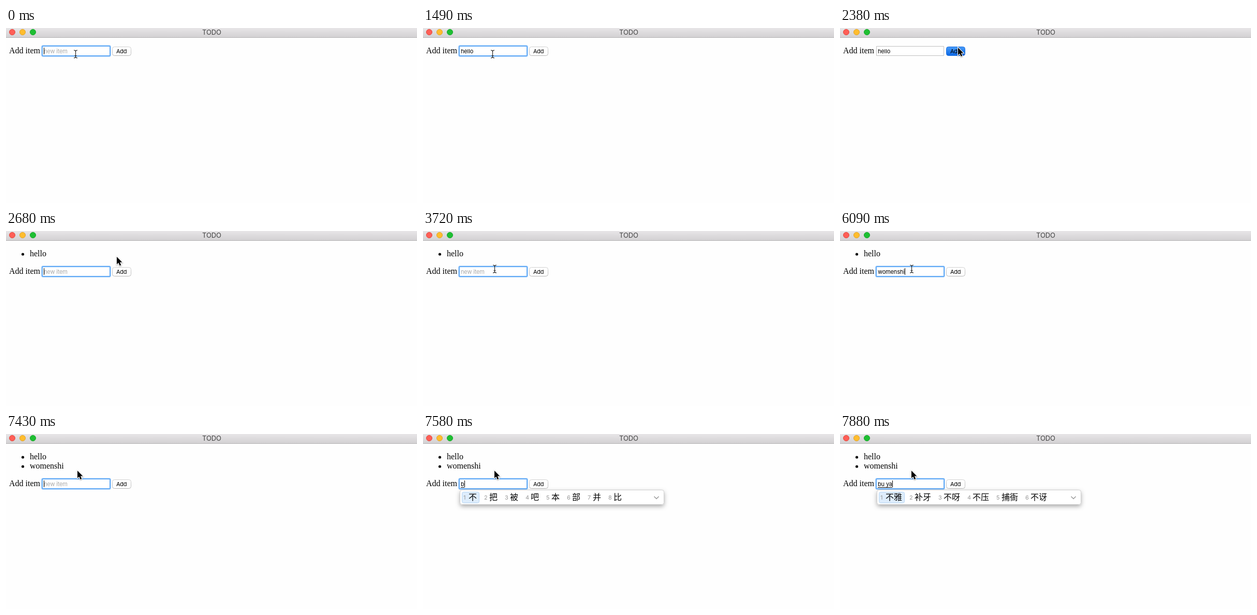
Write an HTML page with a canvas that moves like this. It is 794x339 px and loops after 8000 ms.

```html
<!DOCTYPE html>
<html lang="en">
<head>
<meta charset="utf-8">
<title>TODO</title>
<style>
html, body { margin: 0; width: 100%; height: 100%; overflow: hidden; background: #fefefe; }
canvas { display: block; }
</style>
</head>
<body>
<canvas id="stage" width="794" height="339"></canvas>
<script>
const ctx = document.getElementById('stage').getContext('2d');
const LOOP = 8000;
const UI = 'Inter, sans-serif', SERIF = '16px "Liberation Serif", serif';
const CJK = '16px "Noto Sans CJK SC", "Noto Sans CJK", sans-serif';
const FIELD_X = 73;

const start = { text: '', caret: true, focus: true, pressed: false, items: [], arrow: false, x: 134.5, y: 50.5, words: null };

// Each step changes part of the state from its time on.
const steps = [
  [150, { caret: false }],
  [300, { text: 'h', caret: true }],
  [450, { text: 'he' }],
  [600, { text: 'hel' }],
  [740, { text: 'hell' }],
  [890, { text: 'hello' }],
  [1490, { caret: false }],
  [1790, { x: 146.5, y: 49.5 }],
  [1940, { x: 184.5, y: 46.5, caret: true }],
  [2090, { arrow: true, x: 219, y: 39 }],
  [2230, { x: 228, y: 38 }],
  [2380, { pressed: true, focus: false }],
  [2530, { pressed: false, focus: true, text: '', items: ['hello'] }],
  [2680, { x: 214, y: 50 }],
  [2820, { arrow: false, x: 148.5, y: 68.5 }],
  [2970, { x: 141.5, y: 71.5, caret: false }],
  [3120, { x: 138.5, y: 73.5, caret: true }],
  [3720, { caret: false }],
  [4160, { caret: true }],
  [4610, { text: 'w' }],
  [4760, { text: 'wo' }],
  [5200, { caret: false }],
  [5350, { text: 'wom', caret: true }],
  [5490, { text: 'wome' }],
  [5640, { text: 'women' }],
  [5940, { text: 'womens' }],
  [6090, { text: 'womenshi' }],
  [6390, { text: '', items: ['hello', 'womenshi'], arrow: true, x: 138, y: 71 }],
  [6990, { caret: false }],
  [7430, { caret: true }],
  [7580, { text: 'b', words: ['不', '把', '被', '吧', '本', '部', '并', '比'] }],
  [7730, { text: 'bu', words: ['不', '部', '步', '补', '布', '捕', '卜', '簿'] }],
  [7880, { text: 'bu ya', words: ['不雅', '补牙', '不呀', '不压', '捕衙', '不讶'] }]
];

function stateAt(t) {
  const s = { ...start };
  for (const [time, change] of steps) if (time <= t) Object.assign(s, change);
  return s;
}

function label(str, x, y, font, color = '#000', spacing = 0) {
  ctx.font = font;
  ctx.letterSpacing = spacing + 'px';
  ctx.fillStyle = color;
  ctx.fillText(str, x, y);
}

function box(x, y, w, h, r, fill, stroke, width = 1) {
  ctx.beginPath();
  ctx.roundRect(x, y, w, h, r);
  if (fill) { ctx.fillStyle = fill; ctx.fill(); }
  if (stroke) { ctx.strokeStyle = stroke; ctx.lineWidth = width; ctx.stroke(); }
}

function disc(x, y, r, fill, stroke) {
  ctx.beginPath();
  ctx.arc(x, y, r, 0, 7);
  ctx.fillStyle = fill;
  ctx.fill();
  if (stroke) { ctx.strokeStyle = stroke; ctx.lineWidth = 1; ctx.stroke(); }
}

function fade(y0, y1, ...colors) {
  const g = ctx.createLinearGradient(0, y0, 0, y1);
  colors.forEach((c, i) => g.addColorStop(i / (colors.length - 1), c));
  return g;
}

function shadow(color, blur, dy) {
  ctx.shadowColor = color;
  ctx.shadowBlur = blur;
  ctx.shadowOffsetY = dy;
}

function titleBar() {
  ctx.fillStyle = fade(0, 18, '#e7e5e7', '#d3d1d3');
  ctx.fillRect(0, 0, 794, 18);
  ctx.fillStyle = '#b3b1b3';
  ctx.fillRect(0, 18, 794, 1);
  disc(12, 8, 5.5, '#ff5f57', '#e2483f');
  disc(32, 8, 5.5, '#ffbd2e', '#e0a32a');
  disc(52, 8, 5.5, '#1fbf33', '#16a82a');
  label('TODO', 379, 13, '13px ' + UI, '#404040', -0.1);
}

function form(s, top) {
  label('Add item', 6, top + 14, SERIF);

  if (s.focus) {
    box(70, top, 131, 19, 2, null, 'rgba(90,165,245,.4)', 4);
    box(70, top, 131, 19, 1, '#fff', '#64abf6', 2);
  } else {
    box(70.5, top + .5, 130, 18, 0, '#fff', '#c0c0c0');
  }
  const base = top + 14, font = '11px ' + UI;
  label(s.text || 'new item', FIELD_X, base, font, s.text ? '#000' : '#a9a9a9', -0.15);
  const width = s.text ? Math.round(ctx.measureText(s.text).width) : 0;
  ctx.fillStyle = '#000';
  if (s.words) ctx.fillRect(FIELD_X, base + 2, width, 1);
  if (s.focus && s.caret) ctx.fillRect(FIELD_X + width, top + 3, 1, 13);

  const y = top + 1;
  if (s.pressed) {
    box(205.5, y + .5, 36, 17, 4, fade(y, y + 18, '#4b9efa', '#0764e4'), '#1a6fdf');
  } else {
    box(205.5, y + .5, 36, 17, 4, '#fff', fade(y, y + 18, '#d2d2d2', '#b4b4b4'));
  }
  label('Add', 213, base, font, '#000', -0.3);
}

function candidates(words) {
  ctx.save();
  shadow('rgba(0,0,0,.35)', 8, 3);
  box(71.5, 109, 394, 28, 4, '#fff');
  ctx.restore();
  box(71.5, 108.5, 394, 28, 4, '#fff', '#cfcfcf');
  const step = 24 + words[0].length * 16;
  box(75.5, 112.5, step - 7, 21, 3, '#deedfc', '#b4d4f2');
  words.forEach((word, i) => {
    const x = 78 + i * step;
    label(i + 1, x, 127, '11px ' + UI, '#999');
    label(word, x + 10, 128, CJK);
  });
  ctx.beginPath();
  ctx.moveTo(446.5, 121);
  ctx.lineTo(451, 125.5);
  ctx.lineTo(455.5, 121);
  ctx.strokeStyle = '#999';
  ctx.lineWidth = 1.5;
  ctx.stroke();
}

const ARROW = new Path2D('M0 0V14.5L3.3 11.4L5.7 17L8.3 15.9L5.9 10.4H10.4Z');
const BEAM = new Path2D('M-3.5-7.5Q-.5-7.5 0-5.5Q.5-7.5 3.5-7.5M0-5.5V5.5M-3.5 7.5Q-.5 7.5 0 5.5Q.5 7.5 3.5 7.5M-2 3H2');

function pointer(s) {
  ctx.save();
  ctx.translate(s.x, s.y);
  if (s.arrow) {
    shadow('rgba(0,0,0,.35)', 2, 1);
    ctx.strokeStyle = '#fff';
    ctx.lineWidth = 2;
    ctx.stroke(ARROW);
    ctx.shadowColor = 'transparent';
    ctx.fillStyle = '#000';
    ctx.fill(ARROW);
  } else {
    ctx.strokeStyle = '#222';
    ctx.lineWidth = 1.2;
    ctx.stroke(BEAM);
  }
  ctx.restore();
}

function draw(now) {
  const s = stateAt(now % LOOP);
  ctx.fillStyle = '#fefefe';
  ctx.fillRect(0, 0, 794, 339);
  titleBar();
  s.items.forEach((item, i) => {
    disc(32.5, 45 + i * 18, 2.6, '#000');
    label(item, 46, 49 + i * 18, SERIF);
  });
  const n = s.items.length;
  form(s, 35 + (n ? 16 + n * 18 : 0));
  if (s.words) candidates(s.words);
  pointer(s);
}

const began = performance.now();
function frame() {
  draw(performance.now() - began);
  requestAnimationFrame(frame);
}
frame();
</script>
</body>
</html>
```
